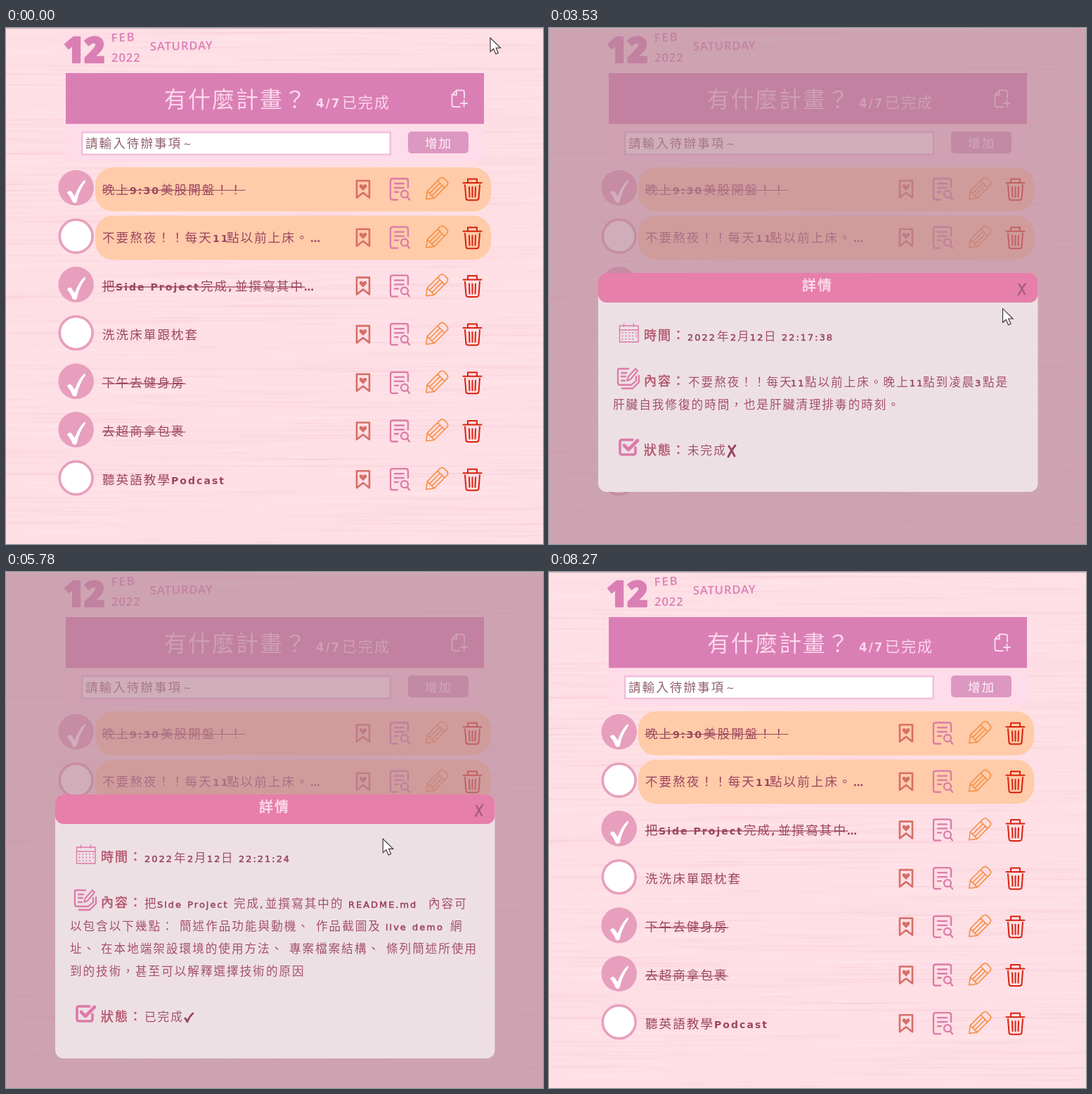
Write an HTML page with a canvas that moves like this. It is 764x733 px and loops after 8.73 s.

```html
<!DOCTYPE html>
<html lang="zh-Hant">
<head>
<meta charset="utf-8">
<title>待辦事項</title>
<style>
html, body { margin: 0; width: 100%; height: 100%; overflow: hidden; background: #fedfe5; }
canvas, svg { position: absolute; left: 0; top: 0; display: block; }
text { font: 300 17.6px "Noto Sans CJK TC", "Noto Sans CJK", sans-serif; letter-spacing: 2px; fill: #9c4560; }
.en { font: 700 .8em "DejaVu Sans", sans-serif; }
.thin .en { font-weight: 400; }
.date { font: 600 16.5px "Open Sans", sans-serif; fill: #da7fb5; }
.day { font: 800 50px "Open Sans", sans-serif; letter-spacing: 0; fill: #da7fb5; stroke: #da7fb5; stroke-width: 2.4; stroke-linejoin: round; }
.title { font-size: 32px; fill: #fbd7ec; }
.count { font-size: 21px; fill: #fbd7ec; }
.hint { fill: #93606e; }
.add { fill: #fff0f7; }
.head { font-size: 20px; fill: #fbdcea; stroke: #fbdcea; stroke-width: .6; }
.label { font-size: 18px; fill: #b4566f; stroke: #b4566f; stroke-width: .45; }
.info { font-size: 16.6px; word-spacing: 1.2px; fill: #a5506a; }
.info .en { font-size: .78em; font-weight: 400; fill: #984260; stroke: #984260; stroke-width: .5; }
.line { fill: none; stroke-linecap: round; stroke-linejoin: round; }
</style>
</head>
<body>
<canvas id="wood" width="764" height="733"></canvas>
<svg id="stage" width="764" height="733" viewBox="0 0 764 733"></svg>
<script>
const LOOP = 8730, PITCH = 68.7, PINK = '#e79fbd';
const $ = id => document.getElementById(id);

// ---- wood grain
function paintWood() {
  const c = $('wood').getContext('2d');
  let seed = 12;
  const rnd = () => (seed = seed * 16807 % 2147483647) / 2147483647;
  c.fillStyle = '#fedfe5';
  c.fillRect(0, 0, 764, 733);
  for (let i = 0; i < 1100; i++) {
    const w = 60 + rnd() * 420, x = rnd() * 1000 - 240, y = rnd() * 733;
    const rgb = rnd() < .5 ? '255,238,241' : '247,196,210';
    const a = .1 + rnd() * .3, g = c.createLinearGradient(x, 0, x + w, 0);
    g.addColorStop(0, `rgba(${rgb},0)`);
    g.addColorStop(.3 + rnd() * .4, `rgba(${rgb},${a})`);
    g.addColorStop(1, `rgba(${rgb},0)`);
    c.fillStyle = g;
    c.fillRect(x, y, w, .7 + rnd() * 2.2);
  }
  c.fillStyle = '#cbb3b8';
  c.fillRect(0, 0, 764, 1);
}

// ---- building blocks
const mix = s => s.replace(/[ -~…]+/g, m => m === ' ' ? m : `<tspan class="en">${m}</tspan>`);
const text = (x, y, s, cls = '') => `<text x="${x}" y="${y}" class="${cls}">${mix(s)}</text>`;
const plain = (x, y, s, cls, extra = '') => `<text x="${x}" y="${y}" class="${cls}" ${extra}>${s}</text>`;
const parts = (list, y, cls) => list.map((v, i) => i % 2 ? text(list[i - 1], y, v, cls) : '').join('');
const rect = (x, y, w, h, fill, r = 0, extra = '') =>
  `<rect x="${x}" y="${y}" width="${w}" height="${h}" rx="${r}" fill="${fill}" ${extra}/>`;
const line = (d, color, w, extra = '') => `<path class="line" d="${d}" stroke="${color}" stroke-width="${w}" ${extra}/>`;
const at = (x, y, s, extra = '') => `<g transform="translate(${x} ${y})" ${extra}>${s}</g>`;

const CHECK = '<path fill="#fff" d="M-13 7Q-9 2-6 6L-2 12Q4-4 12-11Q14-11 13-8Q4 4 1 20Q-2 23-5 20Q-8 12-13 7Z"/>';
const CROSS = 'M-4-7Q0-1 4 7M5-8Q0-2-5 8';
const TICK = 'M-5 1L-2 6Q1-2 6-6';

const ICONS = [
  [508, line('M-9-12H9V12L0 5L-9 12Z', '#d66f66', 2.6, 'stroke-linejoin="miter"') +
    '<path fill="#d66f66" d="M0 2L-5-3Q-6-7-3-7Q-1-7 0-5Q1-7 3-7Q6-7 5-3Z"/>'],
  [560, line('M12-2V-12Q12-15 9-15H-10Q-13-15-13-12V12Q-13 15-10 15H-3M-7-8H6M-7-2H6M-7 4H-2' +
    'M2 7A5 5 0 1 0 12 7A5 5 0 1 0 2 7M11 11L14 15', '#dc7aa8', 2.3)],
  [612, line('M-20 0L-11-7H14Q19-7 19-2V2Q19 7 14 7H-11ZM-11-7V7M10-7V7M-11-2.3H10M-11 2.3H10',
    '#f4934d', 1.7, 'transform="rotate(-45)"')],
  [663.5, line('M-13-9H13M-6.5-9V-14.5H6.5V-9M-10.5-6L-9 13Q-8.5 15.5-6 15.5H6Q8.5 15.5 9 13L10.5-6' +
    'M-4.5-3L-4 11M0-3V11M4.5-3L4 11', '#d8230f', 2)]
];

// [done, pinned, end of strike, x/text pairs]
const ROWS = [
  [1, 1, 340, [137, '晚上', 176, '9:30', 220, '美股開盤！！']],
  [0, 1, 0, [137, '不要熬夜！！每天', 294, '11', 314, '點以前上床。', 433, '…']],
  [1, 0, 425, [137, '把', 156, 'Side Project', 277, '完成,', 326, '並撰寫其中', 424, '…']],
  [0, 0, 0, [137, '洗洗床單跟枕套']],
  [1, 0, 255, [137, '下午去健身房']],
  [1, 0, 255, [137, '去超商拿包裹']],
  [0, 0, 0, [137, '聽英語教學', 235, 'Podcast']]
];

function row([done, pinned, end, words], i) {
  const y = 229 + PITCH * i;
  return (pinned ? rect(127, y - 31, 563, 62.5, '#ffcba8', 25) : '') +
    at(99.7, y - 2, done ? `<circle r="25.3" fill="${PINK}"/>` + CHECK
      : `<circle r="23.4" fill="#fff" stroke="${PINK}" stroke-width="3.6"/>`) +
    parts(words, y + 6.5) +
    (end ? line(`M137 ${y + 1.5}H${end}`, '#9c4560', 1.2) : '') +
    ICONS.map(([x, art]) => at(x, y, art, 'class="icon"')).join('');
}

function page() {
  return plain(82, 49, '12', 'day') +
    plain(150, 20, 'FEB', 'date', 'transform="rotate(-3 150 20)"') +
    plain(150, 48, '2022', 'date', 'style="letter-spacing:1px"') +
    plain(205, 32, 'SATURDAY', 'date', 'style="letter-spacing:.9px" transform="rotate(-1 205 32)"') +
    rect(85, 64, 595, 72.5, '#da7fb5') + rect(85, 136.5, 595, 53, '#ffdcea') +
    text(225, 113, '有什麼計畫？', 'title') + parts([441, '4/7', 478, '已完成'], 113, 'count') +
    at(645, 101, line('M7-2V-10Q7-12.5 4-12.5H-4L-10.5-6V8Q-10.5 11-7.5 11H1M-4-12.5V-6H-10.5M2 6H11M6.7 1.5V11', '#f9d9ec', 1.9)) +
    rect(108.2, 148.2, 438.6, 31.6, '#fff', 0, 'stroke="#efbfdd" stroke-width="2.6"') +
    parts([113, '請輸入待辦事項', 252, '~'], 170, 'hint thin') +
    rect(572, 147, 86, 31, '#dc98c0', 5) + text(596, 170, '增加', 'add') +
    ROWS.map(row).join('');
}

// ---- detail dialogs
const DIALOGS = [
  { top: 348, time: '22:17:38', state: '未完成', mark: CROSS, lines: [
    [198, '不要熬夜！！每天', 344, '11', 364, '點以前上床。晚上', 513, '11', 532, '點到凌晨', 606, '3', 617, '點是'],
    [91, '肝臟自我修復的時間，也是肝臟清理排毒的時刻。']] },
  { top: 316, time: '22:21:24', state: '已完成', mark: TICK, lines: [
    [197, '把', 215, 'Side Project', 324, '完成,', 369, '並撰寫其中的', 487, 'README.md', 601, '內容可'],
    [91, '以包含以下幾點：', 247, '簡述作品功能與動機、', 441, '作品截圖及', 540, 'live demo', 632, '網'],
    [91, '址、', 135, '在本地端架設環境的使用方法、', 403, '專案檔案結構、', 541, '條列簡述所使用'],
    [91, '到的技術，甚至可以解釋選擇技術的原因']] }
];

function dialog({ top, time, state, mark, lines }) {
  const h = 279 + 32 * lines.length - 32, c = '#dc7aa8';
  const end = 220 + 32 * (lines.length - 1), base = top + 6;
  return '<g class="dialog" display="none">' + rect(0, 1, 764, 732, 'rgb(181,131,150)', 0, 'opacity=".65"') +
    rect(70, top, 625.5, h, '#ede0e4', 12) + rect(70, top, 625.5, 42, '#e67fa9', 12) +
    text(360, top + 24.5, '詳情', 'head') +
    at(673, top + 23, line(CROSS, '#a7607f', 2.5)) +
    at(113.5, top + 85, line('M-13-10H13.5V13H-13ZM-13-4H13.5M-7-13V-9M7-13V-9', c, 1.4) +
      line('M-9 0H11M-9 4.5H11M-9 9H6', c, 2, 'stroke-dasharray=".1 4.8"')) +
    at(113, top + 150, line('M0-14H-13Q-15-14-15-12V6Q-15 9-12 9H4L11 3V-3M-10-8H-3M-10-3H-4M-10 3H-5', c, 2.3) +
      line('M-2 3L0-3L10-14L13-11L3 1Z', c, 2) + line('M-9 14H6L15 5V-4', c, 2.4)) +
    at(113, top + end - 5, line('M10 1V8Q10 11 7 11H-9Q-12 11-12 8V-7Q-12-10-9-10H6', c, 3.6) +
      line('M-6-2L0 4L13-9', c, 4.6)) +
    text(135, base + 89, '時間：', 'label') +
    parts([197, '2022', 239, '年', 258, '2', 268, '月', 286, '12', 306, '日', 331, time], base + 90, 'info') +
    text(135, base + 154, '內容：', 'label') +
    lines.map((l, i) => parts(l, base + 155 + 32 * i, 'info')).join('') +
    text(135, base + end, '狀態：', 'label') + text(197, base + end, state, 'info') +
    at(260, top + end + 1, line(mark, '#984260', 2.8)) + '</g>';
}

const POINTERS = {
  arrow: '<path d="M0 0V19.5L4.6 15.5L8 23L11.4 21.5L8.2 14.3H14.5Z" fill="#fff" stroke="#3a2d35" stroke-width="1.1"/>',
  hand: '<path d="M-2.5 2Q-2.5-.5 0-.5T2.5 2V8.5Q5 7.5 6.5 9.5Q9 8.5 10 11Q13 10 13.3 13V18Q13 22 11 24V26.5H0V24Q-4 20-7 15Q-7.5 11.5-5 12L-2.5 14Z" ' +
    'fill="#fff" stroke="#222" stroke-width="1.2"/>' + line('M2.5 8.5V13M6.5 9.5V13M10 11V14', '#222', 1),
  beam: line('M-6-10H-2L0-9L2-10H6M0-9V9M-6 10H-2L0 9L2 10H6', '#1c1418', 1.8)
};

paintWood();
$('stage').innerHTML = page() + DIALOGS.map(dialog).join('') +
  '<circle id="click" r="16" fill="#ffe23c"/><g id="cursor">' +
  Object.entries(POINTERS).map(([k, art]) => `<g id="${k}">${art}</g>`).join('') + '</g>';

// ---- timeline
// [first step, last step, steps, points...]
const MOVES = [
  [50, 910, 12, [689, 14], [668, 110], [610, 220], [580, 270], [598, 299]],
  [980, 1140, 3, [598, 299], [547, 304]],
  [2290, 3150, 12, [547, 304], [490, 397], [464, 450], [500, 505], [577, 468]],
  [3220, 3680, 7, [577, 468], [673, 371]],
  [4460, 5090, 9, [673, 371], [557, 370]],
  [5780, 6560, 11, [557, 370], [500, 395], [454, 450], [470, 500], [501, 514]],
  [6660, 7490, 12, [501, 514], [500, 542], [520, 580], [600, 470], [644, 378]],
  [7590, 7810, 4, [644, 378], [673, 339]],
  [8190, 8190, 1, [673, 339], [691, 336]]
];
const CLICKS = [[1370, 1520, .8], [4090, 4160, .7], [5550, 5630, .62], [7960, 8040, .7]];
const OPEN = [[1460, 4160], [5630, 8040]];
const during = ([a, b], t) => t >= a && t < b;

function along(pts, p) {
  const f = p * (pts.length - 1), i = Math.min(Math.floor(f), pts.length - 2), k = f - i;
  return pts[i].map((v, j) => v + (pts[i + 1][j] - v) * k);
}

function cursorAt(t) {
  let pos = MOVES[0][3];
  for (const [a, b, n, ...pts] of MOVES) {
    if (t < a) break;
    const step = (b - a) / (n - 1) || 1;
    pos = along(pts, Math.min(n, Math.floor((t - a) / step + 1e-6) + 1) / n);
  }
  return pos;
}

const icons = [...document.querySelectorAll('.icon')];
const dialogs = [...document.querySelectorAll('.dialog')];

function iconAt(x, y) {
  const r = Math.round((y - 229) / PITCH), c = ICONS.findIndex(i => Math.abs(x - i[0]) < 16);
  return c >= 0 && r >= 0 && r < 7 && Math.abs(y - 229 - PITCH * r) < 17 ? r * 4 + c : -1;
}

function pointerIn({ top, lines }, x, y) {
  if (Math.hypot(x - 673, y - top - 23) < 12) return 'hand';
  const n = Math.round((y - top - 154) / 32);
  const l = Math.abs(y - top - 154 - 32 * n) < 12 && lines[n];
  return l && x > l[0] && x < l[l.length - 2] + l[l.length - 1].length * 18.6 ? 'beam' : 'arrow';
}

function draw(t) {
  const [x, y] = cursorAt(t), open = OPEN.findIndex(o => during(o, t));
  const hover = open < 0 ? iconAt(x, y) : -1;
  const onButton = open < 0 && x > 572 && x < 658 && y > 147 && y < 178;
  const kind = open >= 0 ? pointerIn(DIALOGS[open], x, y) : hover >= 0 || onButton ? 'hand' : 'arrow';
  const click = CLICKS.find(c => during(c, t));
  dialogs.forEach((d, i) => d.setAttribute('display', i === open ? 'inline' : 'none'));
  icons.forEach((el, i) => el.setAttribute('opacity', i === hover ? .5 : 1));
  for (const k in POINTERS) $(k).setAttribute('display', k === kind ? 'inline' : 'none');
  for (const id of ['click', 'cursor']) $(id).setAttribute('transform', `translate(${x} ${y})`);
  $('click').setAttribute('opacity', click ? click[2] : 0);
  $('cursor').setAttribute('opacity', t < 8270 ? 1 : 0);
}

const start = performance.now();
function tick() {
  draw((performance.now() - start) % LOOP);
  requestAnimationFrame(tick);
}
tick();
</script>
</body>
</html>
```
